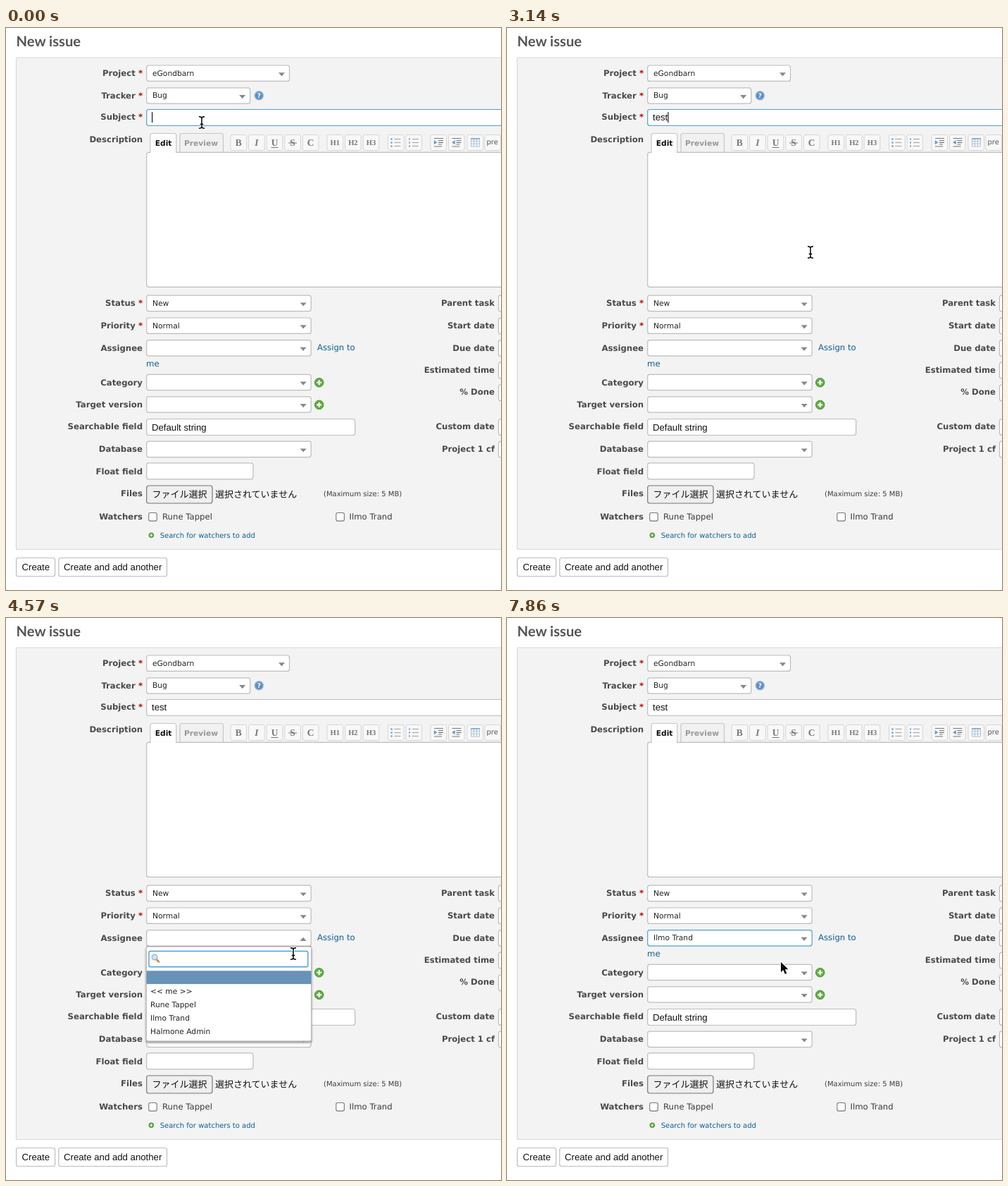
Recreate the animation shown at these times as an HTML page. Size 703 px wide and 797 px high, loop 8 s.

```html
<!DOCTYPE html>
<html lang="en">
<head>
<meta charset="utf-8">
<title>New issue</title>
<style>
  html, body { margin: 0; width: 100%; height: 100%; overflow: hidden; background: #fff; }
  svg { display: block; width: 703px; height: 797px; }
  text { font: 11.7px "DejaVu Sans", Verdana, sans-serif; fill: #3c3c3c; white-space: pre; text-rendering: geometricPrecision; }
  .title { font: 700 20.2px Lato, sans-serif; fill: #555; }
  .label { font-weight: 700; fill: #4a4a4a; text-anchor: end; }
  .star { fill: #b00; }
  .pick { font-size: 10.7px; fill: #222; }
  .link { fill: #0f5f95; }
  .small { font-size: 10px; }
  .input { font: 13.2px "Liberation Sans", Arial, sans-serif; fill: #111; }
  .cjk { font: 13px "Noto Sans CJK JP", "Noto Sans CJK", sans-serif; fill: #111; }
  .tab { font-size: 10.7px; font-weight: 700; fill: #111; }
  .off { fill: #999; }
  .tool { font: 700 13.5px "Liberation Serif", Times, serif; fill: #777; text-anchor: middle; }
  .head { font-size: 10.6px; }
  .pre { font: 10px "DejaVu Sans", sans-serif; fill: #555; }
  .white { fill: #fff; }
</style>
</head>
<body>
<svg id="stage" viewBox="0 0 703 797" xmlns="http://www.w3.org/2000/svg"></svg>
<script>
const LOOP = 8000;
const PROJECT = 'eGondbarn';
const PEOPLE = ['Rune Tappel', 'Ilmo Trand', 'Halmone Admin'];
const BORDER = '#bdbdbd', FOCUS = '#4f9fd0', BAR = '#6893b9';

const esc = s => s.replace(/&/g, '&amp;').replace(/</g, '&lt;').replace(/>/g, '&gt;');
const text = (x, y, s, cls = '', id = '') =>
  `<text x="${x}" y="${y}" class="${cls}" id="${id}">${esc(s)}</text>`;
const path = (d, stroke, width = 1, fill = 'none') =>
  `<path d="${d}" stroke="${stroke}" stroke-width="${width}" fill="${fill}"/>`;
const box = (x, y, w, h, { fill = '#fff', stroke = BORDER, r = 3, id = '', sw = 1.2 } = {}) =>
  `<rect x="${x}" y="${y}" width="${w}" height="${h}" rx="${r}" fill="${fill}" stroke="${stroke}" stroke-width="${sw}" id="${id}"/>`;
const arrow = (x, y, id = '') => `<path d="M${x - 4.5} ${y - 2.5}h9l-4.5 5.2z" fill="#888" id="${id}"/>`;
const select = (y, w, value = '') =>
  box(199.7, y, w, 22.4) + arrow(199.7 + w - 11, y + 12.7) + text(208, y + 14.6, value, 'pick');
const label = (y, s, need) =>
  `<text x="194" y="${y}" class="label">${s}${need ? ' <tspan class="star">*</tspan>' : ''}</text>`;
const plus = (x, y, r) =>
  `<circle cx="${x}" cy="${y}" r="${r}" fill="#62ad45" stroke="#4a9636"/>` +
  path(`M${x - r * .55} ${y}h${r * 1.1}M${x} ${y - r * .55}v${r * 1.1}`, '#fff', r * .33);

function labels() {
  const left = [
    [68, 'Project', 1], [100, 'Tracker', 1], [130.3, 'Subject', 1], [162, 'Description'],
    [394, 'Status', 1], [426, 'Priority', 1], [457.5, 'Assignee'], [507, 'Category'],
    [538, 'Target version'], [569.3, 'Searchable field'], [601, 'Database'],
    [632.7, 'Float field'], [664, 'Files'], [697.2, 'Watchers']];
  const right = [[394, 'Parent task'], [426, 'Start date'], [457.5, 'Due date'], [489, 'Estimated time'],
    [520, '% Done'], [569.3, 'Custom date'], [601, 'Project 1 cf']];
  return left.map(l => label(...l)).join('') + right.map(([y, s]) =>
    text(694, y, s, 'label') + box(699.5, y - (s === '% Done' ? 14 : 14.8), 20, 22.8)).join('');
}

function toolbar() {
  const key = (x, inner) => box(x, 151.5, 22.6, 22.2, { fill: '#f8f8f8', stroke: '#d6d6d6', r: 2.5, sw: 1 }) + inner;
  let out = '';
  [...'BIUSC'].forEach((c, i) => {
    const x = 319 + i * 25.6, m = x + 11.3;
    let mark = text(m, 167, c, 'tool');
    if (c === 'I') mark = mark.replace('<text', '<text font-style="italic" style="font-style:italic"');
    if (c === 'U') mark += path(`M${m - 5} 169.5h10`, '#777');
    if (c === 'S') mark += path(`M${m - 6} 163h12`, '#777');
    out += key(x, mark);
  });
  ['H1', 'H2', 'H3'].forEach((s, i) => {
    const x = 456 + i * 25.6;
    out += key(x, text(x + 11.3, 166, s, 'tool head'));
  });
  [542.5, 568].forEach((x, i) => {
    let rows = '';
    for (let k = 0; k < 3; k++) {
      const y = 157.5 + k * 5;
      rows += path(`M${x + 9} ${y}h9`, '#aaa', 1.2) +
        (i ? path(`M${x + 5} ${y - 1.6}v3.2`, '#6d9fc8', 1.4) : `<circle cx="${x + 5}" cy="${y}" r="1.5" fill="#86b1d6"/>`);
    }
    out += key(x, rows);
  });
  [603, 628.5].forEach((x, i) => {
    const tip = i ? `M${x + 9} 159.5l-4 2.7 4 2.7z` : `M${x + 5} 159.5l4 2.7-4 2.7z`;
    out += key(x, path(`M${x + 5} 156.5h13M${x + 11} 159.5h7M${x + 11} 162.3h7M${x + 11} 165h5M${x + 5} 168h11`, '#777', 1.2) +
      path(tip, '#6a9bc5', .5, '#6a9bc5'));
  });
  out += key(655, path('M660.5 156.5h12v11.5h-12zM660.5 160.3h12M660.5 164.2h12M664.5 156.5v11.5M668.5 156.5v11.5', '#a9c1d8', 1, '#fff') +
    path('M660 157h13', '#86add0', 1.8));
  return out + key(680, text(682.5, 165, 'pre', 'pre'));
}

function form() {
  const tabs = box(247, 149.5, 61.5, 30, { fill: '#f1f1f1', stroke: '#c6c6c6' }) + text(253, 167, 'Preview', 'tab off') +
    box(205, 149.5, 36.8, 30, { stroke: '#c6c6c6' });
  const check = x => box(x, 687.5, 11.6, 11.6, { stroke: '#777', r: 2.3, sw: 1.1 });
  return text(14.5, 26.3, 'New issue', 'title') +
    box(14.5, 42, 720, 697.5, { fill: '#f3f3f3', stroke: '#d9d9d9', r: 1 }) + labels() +
    select(53, 202.8, PROJECT) + select(84.8, 147, 'Bug') +
    `<circle cx="359.3" cy="95.8" r="6.2" fill="#5d8fc7" stroke="#a9bfd8" stroke-width="1.4"/>` +
    `<text x="359.3" y="99.3" class="white" style="font-size:9px;font-weight:700;fill:#fff;text-anchor:middle">?</text>` +
    box(199.7, 115.5, 520, 23, { id: 'subjectBox' }) + text(207, 131.4, '', 'input', 'subject') +
    tabs + box(199.7, 176.3, 520, 191) + path('M205.7 176.3h35.4', '#fff', 2.2) + text(211.7, 167, 'Edit', 'tab') + toolbar() +
    select(379.2, 233.5, 'New') + select(411, 233.5, 'Normal') +
    box(199.7, 442.7, 233.5, 22.4, { id: 'assigneeBox' }) + arrow(422, 455.2, 'assigneeArrow') + text(208, 457.4, '', 'pick', 'assignee') +
    text(442, 456.6, 'Assign to', 'link') + text(199, 479.5, 'me', 'link') +
    select(491.3, 233.5) + plus(444.7, 502.8, 6.3) + select(522.8, 233.5) + plus(444.7, 534.4, 6.3) +
    box(199.7, 554.5, 296, 23) + text(207, 570.6, 'Default string', 'input') +
    select(586.2, 233.5) + box(199.7, 616.8, 151.3, 23) +
    box(199.7, 649, 93.3, 25, { fill: '#efefef', stroke: '#777' }) +
    text(207.5, 666.2, 'ファイル選択', 'cjk') + text(297, 666.2, '選択されていません', 'cjk') +
    text(451, 664, '(Maximum size: 5 MB)', 'small') +
    check(202.7) + text(222, 697.3, PEOPLE[0]) + check(468.8) + text(487.5, 697.3, PEOPLE[1]) +
    plus(206.3, 719.3, 3.4) + text(218.7, 722.8, 'Search for watchers to add', 'link small') +
    box(14.6, 751.5, 55, 26, { r: 2.5 }) + text(22.5, 768.7, 'Create', 'input') +
    box(74.8, 751.5, 153.7, 26, { r: 2.5 }) + text(82, 768.7, 'Create and add another', 'input');
}

function dropdown() {
  const names = ['<< me >>', ...PEOPLE].map((s, i) => text(205, 533.2 + i * 19, s, 'pick')).join('');
  return `<g id="menu"><g filter="url(#shade)">${box(199.2, 466, 234.5, 134, { stroke: '#aaa', r: 2.5, id: 'panel', sw: 1 })}</g>` +
    path('M199 465.6h235', '#aaa') +
    box(203, 472.5, 225.8, 22.3, { stroke: FOCUS, r: 2, sw: 1.4 }) +
    path('M213.5 484l4.3 4.2', '#c98b50', 2.6) +
    `<circle cx="211" cy="481" r="3.8" fill="#cfe3f5" stroke="#94aeca" stroke-width="1.3"/>` +
    text(223.5, 488.2, '', 'input', 'query') +
    `<rect x="199.5" y="500.3" width="234" height="18.8" fill="${BAR}"/>` +
    text(204.5, 513.6, PEOPLE[1], 'pick white', 'match').replace('<text', '<text style="fill:#fff"') +
    `<g id="all">${names}</g></g>`;
}

function pointers() {
  const beam = 'M-4 -8.3Q0 -8.3 0 -5.8Q0 -8.3 4 -8.3M0 -6V6M-4 8.3Q0 8.3 0 5.8Q0 8.3 4 8.3M-2.3 2.5H2.3';
  const hand = 'M1.5 0Q3.2 -.3 3.7 1.5L5 6.5Q7 5.3 8 7Q10 6 11 7.8Q13 7.2 13.6 9.2Q14.8 13 12.8 15.5L12.6 18H5.3' +
    'Q4.5 15.5 -1.5 10.5Q-2.6 8.6 -.6 8.4Q.8 8.4 2.3 10.2L.2 2Q0 .5 1.5 0Z';
  const arrowTip = 'M0 0V14.2L3.3 11.1L5.9 17L8.3 16L5.8 10.2H10.4Z';
  return `<g id="beam">${path(beam, '#fff', 3.4)}${path(beam, '#000', 1.5)}</g>` +
    `<g id="hand">${path(hand, '#000', 1.2, '#fff')}${path('M6.7 11v4.2M8.9 11v4.2M11 11v4.2', '#000', .9)}</g>` +
    `<g id="tip">${path(arrowTip, '#fff', 2, '#000')}${path(arrowTip, 'none', 0, '#000')}</g>`;
}

document.getElementById('stage').innerHTML =
  '<defs><filter id="shade" x="-5%" y="-5%" width="110%" height="115%"><feDropShadow dx="0" dy="2" stdDeviation="1.6" flood-opacity=".45"/></filter></defs>' +
  form() + dropdown() + path('M0 0v15', '#000', 1.1).replace('<path', '<path id="caret"') + pointers();

// Each track lists [start ms, value...]; a value holds until the next start.
const tracks = {
  subject: [[0, ''], [1290, 't'], [1430, 'te'], [1860, 'tes'], [2140, 'test']],
  query: [[0, ''], [5430, 'i'], [5860, 'il'], [6430, 'ilm']],
  caret: [[0, 1], [430, 0], [860, 1], [2570, 0], [3000, 1], [3570, 0], [4860, 1], [6860, 0]],
  focus: [[0, 'subject'], [4290, 'query'], [7290, 'assignee']],
  filtered: [[0, false], [5430, true]],
  pointer: [[0, 'beam', 278, 134], [1290, ''], [2430, 'beam', 279, 136], [2570, 'beam', 290, 152],
    [2710, 'beam', 317, 188], [2860, 'beam', 362, 240], [3000, 'beam', 408, 287], [3140, 'beam', 431, 318],
    [3290, 'beam', 427, 352], [3430, 'hand', 396, 448], [3570, 'hand', 386, 459], [3710, 'hand', 381, 461],
    [3860, 'hand', 380, 461], [4430, 'hand', 390, 460], [4570, 'beam', 408, 476], [5430, ''],
    [7710, 'tip', 389, 484], [7860, 'tip', 389, 488]]
};
const at = (name, t) => tracks[name].findLast(step => step[0] <= t).slice(1);
const el = id => document.getElementById(id);
const show = (id, on) => el(id).setAttribute('visibility', on ? 'visible' : 'hidden');

function draw(t) {
  const [focus] = at('focus', t), [filtered] = at('filtered', t), [caret] = at('caret', t);
  const open = focus === 'query';

  el('subject').textContent = at('subject', t)[0];
  el('query').textContent = at('query', t)[0];
  el('assignee').textContent = focus === 'assignee' ? PEOPLE[1] : '';
  for (const id of ['subject', 'assignee']) {
    el(id + 'Box').setAttribute('stroke', focus === id ? FOCUS : BORDER);
  }
  el('assigneeArrow').setAttribute('transform', open ? 'rotate(180 422 455.3)' : '');

  el('menu').style.display = open ? '' : 'none';
  el('panel').setAttribute('height', filtered ? 58 : 134);
  el('all').style.display = filtered ? 'none' : '';
  el('match').style.display = filtered ? '' : 'none';

  show('caret', caret && focus !== 'assignee');
  if (focus !== 'assignee') {
    const x = (open ? 224 : 207.6) + el(focus).getComputedTextLength();
    el('caret').setAttribute('transform', `translate(${x} ${open ? 476.3 : 119.3})`);
  }

  const [kind, px, py] = at('pointer', t);
  for (const id of ['beam', 'hand', 'tip']) show(id, id === kind);
  if (kind) el(kind).setAttribute('transform', `translate(${px} ${py})`);
}

const start = performance.now();
function tick() {
  draw((performance.now() - start) % LOOP);
  requestAnimationFrame(tick);
}
tick();
</script>
</body>
</html>
```
